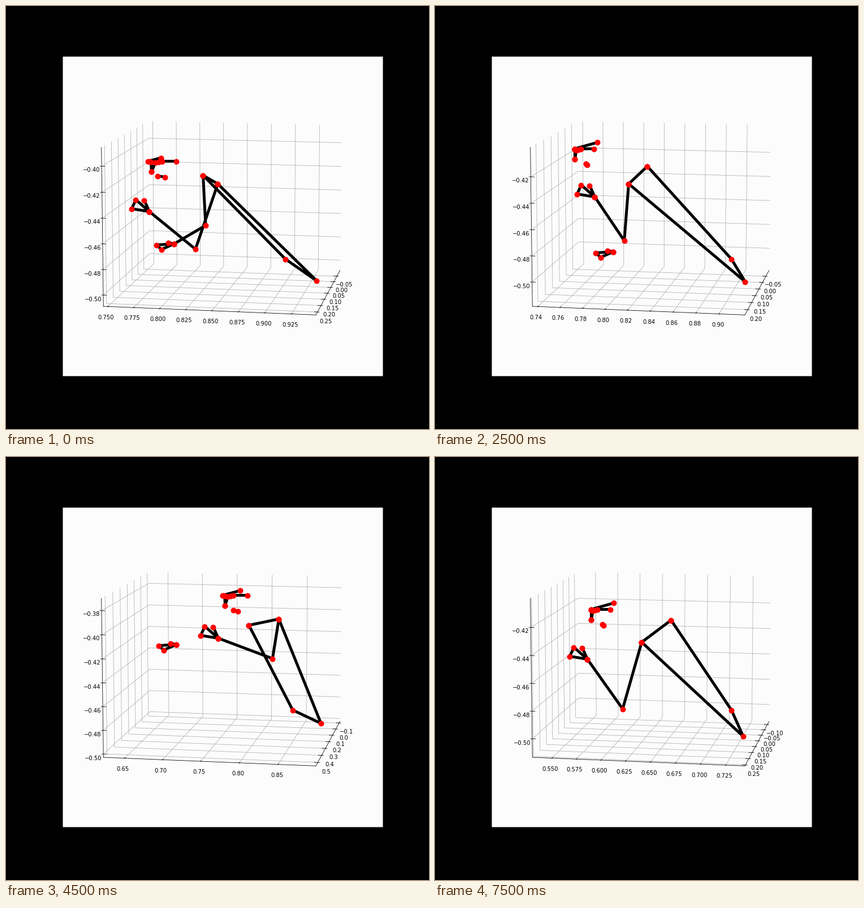
Animation of 748 by 748 pixels, one loop 8 s. Source, as a matplotlib script:

```python
import numpy as np
import matplotlib.pyplot as plt
from matplotlib.animation import FuncAnimation
from matplotlib.patches import Rectangle
from matplotlib.ticker import MaxNLocator

STAGE = 748
STEPS, STEP_MS = 16, 500

# Camera and box, in the proportions of a classic 3D plot
ELEV, AZIM, DIST = np.radians(10), np.radians(-80), 10
SIZE = np.array([8, 8, 6]) / 7
CENTER, SCALE = (391.3, 364.8), 3050

E = 0.5 + 1 / 48            # box edge, just outside the limits
L = E + 0.0407              # label distance
OUT, IN = E + 0.1 / 12, E - 0.2 / 12

LOCATOR = MaxNLocator(9, steps=[1, 2, 2.5, 5, 10])

# Everything moves in straight lines between these steps
KEYS = [0, 3, 5, 7, 9, 13, 15]


def path(*values):
    """Return a function of the step that runs through the key values."""
    columns = np.array(values, float).reshape(len(KEYS), -1).T
    return lambda step: np.array([np.interp(step, KEYS, c) for c in columns])


nose = path((257, 292), (271, 282), (247, 270), (233, 263), (387, 262),
            (381, 258), (276, 287))
near_shoulder = path((374, 314), (362, 319), (342, 314), (365, 307),
                     (482, 286), (523, 285), (365, 327))
far_shoulder = path((348, 299), (375, 288), (375, 283), (372, 288),
                    (429, 297), (364, 288), (417, 288))
near_wrist = path((253, 363), (267, 331), (282, 337), (286, 347), (375, 320),
                  (466, 338), (269, 357))
far_wrist = path((297, 420), (338, 452), (315, 434), (333, 391), (301, 331),
                 (337, 318), (337, 318))
look = path(.4, .3, .05, -.15, .25, 1, .05)      # 0 profile, 1 facing us
rise = path(.05, .05, 0, -.1, .5, 1, -.2)        # near hip lifting
sag = path(91, 98, 89, 62, 53, 42, 103)          # near elbow below the arm

# Start and end of each axis; y runs from front to back
x_limits = path((.7498, .9436), (.7254, .9436), (.7389, .9186),
                (.7346, .9062), (.6275, .8927), (.6985, .8584),
                (.5343, .7397))
y_limits = path((.265, -.096), (.265, -.096), (.229, -.0915), (.23, -.099),
                (.534, -.112), (.585, -.056), (.2505, -.1225))
z_limits = path((-.5064, -.388), (-.5218, -.4047), (-.5163, -.4003),
                (-.5119, -.3864), (-.5001, -.3725), (-.4895, -.3602),
                (-.5112, -.4017))


def face(origin, turn):
    """Two rows from nose over eye to ear, and the mouth."""
    near = [(-(3 + 6.5 * i) * turn, -17 - i / 2) for i in range(3)]
    far = [(2 + 3.5 * i + (12 + 6 * i) * turn, -16 - i) for i in range(3)]
    near_ear = (43 - 66 * turn, -30 + 15 * turn)
    far_ear = (32 + 29 * turn, -18)
    mouth = [(21 - 26 * turn, 8), (21 + 7 * turn, 10)]
    return [origin + np.array(row) for row in
            ([(0, 0), *near, near_ear], [(0, 0), *far, far_ear], mouth)]


def arm(shoulder, elbow, wrist, fingers):
    """Upper and lower arm, then the hand's triangle and thumb."""
    pinky, index, thumb = wrist + np.array(fingers)
    return [np.array([shoulder, elbow, wrist]),
            np.array([wrist, pinky, index, wrist, thumb])]


def skeleton(step):
    turn, lift, drop = look(step)[0], rise(step)[0], sag(step)[0]
    swing = max(0, turn - 0.4) / 0.6
    s1, s2 = near_shoulder(step), far_shoulder(step)
    w1, w2 = near_wrist(step), far_wrist(step)
    if step > 13:
        w2 = w2 * np.nan
    e1 = (s1 + w1) / 2 + (72 - 0.56 * drop, drop)
    e2 = (s2 + w2) / 2 + (30 - 144 * swing, 28)
    if turn < 0.28:
        e2 = e2 * np.nan
    h1 = np.array([548 + 17 * lift, 487 - 33 * lift])
    h2 = np.array([528 - 86 * abs(turn), 447])

    hand1 = np.array([(-31, -5), (-24, -21), (-9, -20)]) * (1 - 0.4 * swing)
    hand2 = np.array([(-19, 10), (-26, 2), (-9, -2)]) * (1.2 - 3.2 * swing, 1)
    torso = np.array([s1, s2, h2, h1, s1])
    return (face(nose(step), turn) + [torso]
            + arm(s1, e1, w1, hand1) + arm(s2, e2, w2, hand2))


def project(points):
    """Map points in box units (-0.5 to 0.5 per axis) to stage pixels."""
    p = np.asarray(points, float) * SIZE
    ce, se, ca, sa = np.cos(ELEV), np.sin(ELEV), np.cos(AZIM), np.sin(AZIM)
    right = p @ (-sa, ca, 0)
    up = p @ (-se * ca, -se * sa, ce)
    depth = DIST - p @ (ce * ca, ce * sa, se)
    return (CENTER[0] + SCALE * right / depth,
            CENTER[1] - SCALE * up / depth)


def ticks_for(start, end):
    """Yield box position and label of each tick inside the limits."""
    lo, hi = sorted((start, end))
    values = LOCATOR.tick_values(lo, hi)
    gap = values[1] - values[0]
    digits = next(d for d in range(1, 6) if abs(round(gap, d) - gap) < 1e-9)
    for v in values:
        if lo <= v <= hi:
            text = f"{round(v, digits) + 0.0:.{digits}f}".replace("-", "\u2212")
            yield (v - start) / (end - start) - 0.5, text


# Per axis: limits, edge line, grid line, tick mark and label place
AXES = [
    (x_limits, [(-E, -E, -E), (E, -E, -E)],
     lambda u: [(u, -E, -E), (u, E, -E), (u, E, E)],
     lambda u: [(u, -OUT, -E), (u, -IN, -E)], lambda u: (u, -L, -L)),
    (y_limits, [(E, -E, -E), (E, E, -E)],
     lambda u: [(E, u, -E), (-E, u, -E), (-E, u, E)],
     lambda u: [(OUT, u, -E), (IN, u, -E)], lambda u: (L, u, -L)),
    (z_limits, [(-E, -E, -E), (-E, -E, E)],
     lambda u: [(-E, -E, u), (-E, E, u), (E, E, u)],
     lambda u: [(-OUT, -E, u), (-IN, -E, u)], lambda u: (-L, -L, u)),
]

fig = plt.figure(figsize=(STAGE / 72, STAGE / 72), dpi=72, facecolor="black")
ax = fig.add_axes([0, 0, 1, 1])


def stroke(points, color):
    ax.plot(*project(points), color=color, lw=0.8)


def draw(step):
    ax.clear()
    ax.set(xlim=(0, STAGE), ylim=(STAGE, 0))
    ax.axis("off")
    ax.add_patch(Rectangle((100.5, 89.5), 566, 565, fc="#fcfcfc", lw=0,
                           snap=False))

    ticks = [list(ticks_for(*limits(step))) for limits, *_ in AXES]
    for (_, _, grid, _, _), marks in zip(AXES, ticks):
        for u, _ in marks:
            stroke(grid(u), "#b0b0b0")
    for (_, edge, _, tick, place), marks in zip(AXES, ticks):
        stroke(edge, "black")
        for u, text in marks:
            stroke(tick(u), "black")
            ax.text(*project(place(u)), text, fontsize=10,
                    family="DejaVu Sans", ha="center", va="top")

    for bones in skeleton(step):
        x, y = bones.T + 0.5
        ax.plot(x, y, color="black", lw=5, solid_joinstyle="round")
        ax.plot(x, y, "o", color="red", ms=10, mew=0, zorder=5)
    return []


anim = FuncAnimation(fig, draw, frames=STEPS, interval=STEP_MS,
                     init_func=lambda: [], repeat=True)
plt.show()
```
